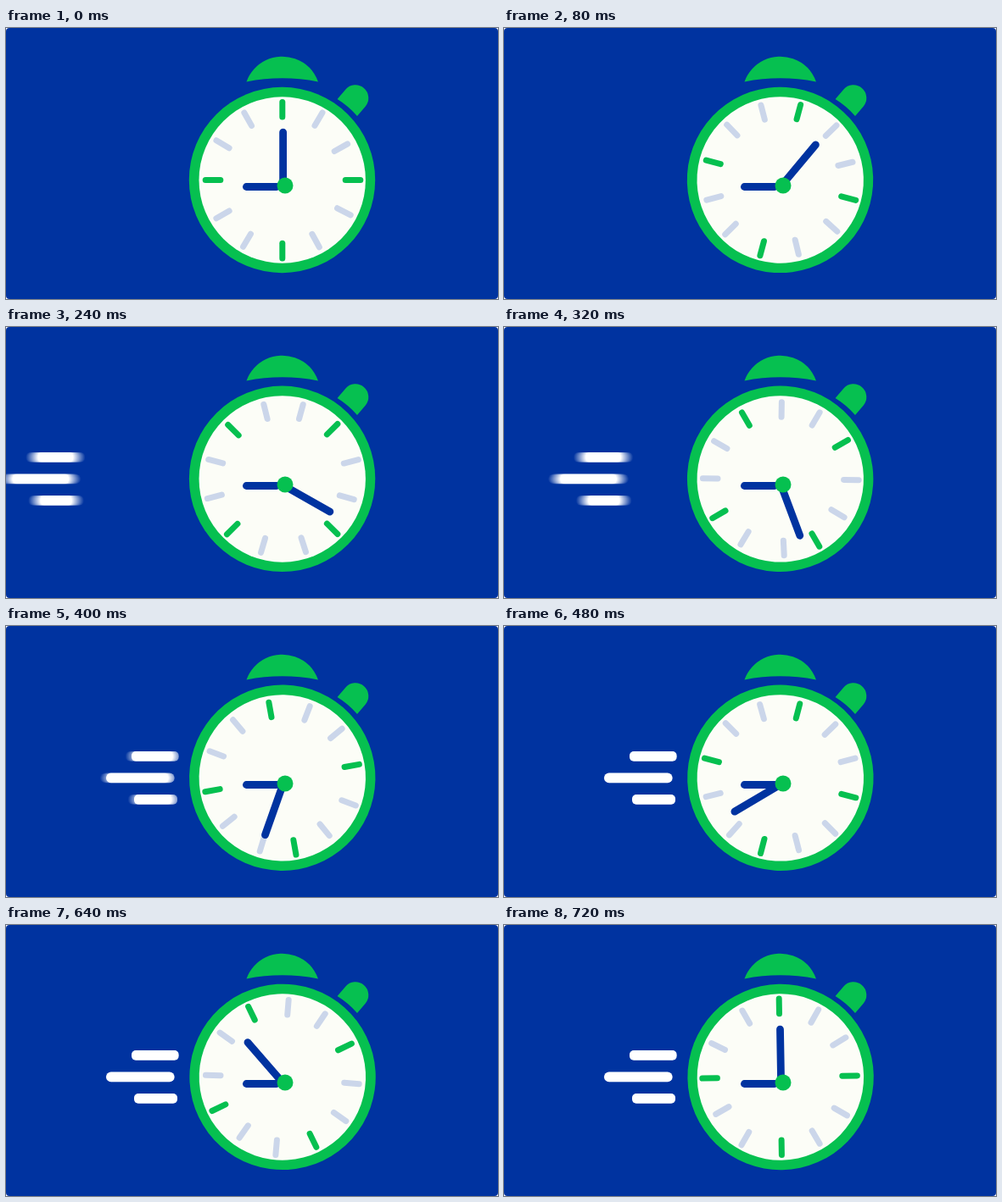
These frames come from a looping animation (580 by 320 pixels, 760 ms). An HTML page with a canvas:

```html
<!DOCTYPE html>
<html lang="en">
<head>
<meta charset="utf-8">
<title>Fast clock</title>
<style>
  html, body { margin: 0; width: 100%; height: 100%; overflow: hidden; background: #fff; }
  canvas { display: block; }
</style>
</head>
<body>
<canvas id="stage" width="580" height="320"></canvas>
<script>
const BLUE = '#0033a0', GREEN = '#06c050', FACE = '#fcfdf7', PALE = '#cbd6ea';
const LOOP = 760, STEP = 40;
const CENTER = { x: 325.8, y: 179.5 };
const PIVOT = { x: 326.6, y: 186.7 };

// Hand-drawn dial: angle in degrees and distance from the center
const TICKS = [
  [0, 83.2], [30.7, 83.6], [61, 79], [90, 83.2], [117.2, 81.6], [151.2, 81.6],
  [180, 83.6], [210.4, 82.6], [239.8, 81.3], [270, 81.8], [301, 82], [330.5, 82.5]
];
// Speed lines at rest: x, y, width, corner radius
const STREAKS = [[148, 148, 55.6, 5], [118, 173.6, 80.6, 5.8], [151, 199, 51, 5]];

const ctx = document.getElementById('stage').getContext('2d');
const blurLayer = document.createElement('canvas');
blurLayer.width = 220;
blurLayer.height = 320;
const blurCtx = blurLayer.getContext('2d');

const rad = deg => deg * Math.PI / 180;

function disc(x, y, r, color) {
  ctx.fillStyle = color;
  ctx.beginPath();
  ctx.arc(x, y, r, 0, Math.PI * 2);
  ctx.fill();
}

function bar(x1, y1, x2, y2, width, color) {
  ctx.strokeStyle = color;
  ctx.lineWidth = width;
  ctx.lineCap = 'round';
  ctx.beginPath();
  ctx.moveTo(x1, y1);
  ctx.lineTo(x2, y2);
  ctx.stroke();
}

function drawBackground() {
  ctx.clearRect(0, 0, 580, 320);
  ctx.fillStyle = BLUE;
  ctx.beginPath();
  ctx.roundRect(0, 0, 580, 320, 4);
  ctx.fill();
}

function drawBell() {
  ctx.fillStyle = GREEN;
  ctx.beginPath();
  ctx.arc(325.7, 78.5, 44.8, rad(199.5), rad(340.5));
  ctx.quadraticCurveTo(325.7, 55.2, 283.5, 63.5);
  ctx.fill();
}

function drawButton() {
  ctx.save();
  ctx.translate(411.9, 82.7);
  ctx.rotate(rad(40.5));
  ctx.beginPath();
  ctx.arc(0, 0, 15.4, Math.PI, 0);
  ctx.lineTo(15.4, 14.8);
  ctx.quadraticCurveTo(0, 12.4, -15.4, 14.8);
  ctx.fillStyle = GREEN;
  ctx.fill();
  ctx.restore();
}

// The dial speeds up halfway through
function dialAngle(t) {
  return t < 360 ? t * 0.1875 : 67.5 + (t - 360) * 111.5 / 360;
}

function drawDial(t) {
  ctx.save();
  ctx.translate(CENTER.x, CENTER.y);
  ctx.rotate(rad(dialAngle(t)));
  disc(-0.3, 0, 109.7, GREEN);
  disc(-0.1, 0, 98.2, FACE);
  TICKS.forEach(([angle, r], i) => {
    ctx.save();
    ctx.rotate(rad(angle));
    bar(0, -r - 8.8, 0, -r + 8.8, 7, i % 3 ? PALE : GREEN);
    ctx.restore();
  });
  ctx.restore();
}

function drawHands(t) {
  const angle = rad(359 * t / 720);
  bar(283.4, 187.5, 319, 187.5, 8.8, BLUE);
  bar(PIVOT.x, PIVOT.y,
      PIVOT.x + 63.6 * Math.sin(angle), PIVOT.y - 63.6 * Math.cos(angle), 8.8, BLUE);
  disc(329, 186, 9.5, GREEN);
}

// Average of several moments gives motion blur
function drawStreaks(t) {
  const samples = 15, shutter = 20;
  blurCtx.clearRect(0, 0, 220, 320);
  blurCtx.globalCompositeOperation = 'lighter';
  blurCtx.fillStyle = '#fff';
  blurCtx.globalAlpha = 1 / samples;
  for (let i = 0; i < samples; i++) {
    const moment = t + ((i + 0.5) / samples - 0.5) * shutter;
    const shift = Math.min(0, (moment - 400) * 0.734);
    for (const [x, y, w, r] of STREAKS) {
      blurCtx.beginPath();
      blurCtx.roundRect(x + shift, y, w, 11.7, r);
      blurCtx.fill();
    }
  }
  ctx.drawImage(blurLayer, 0, 0);
}

const start = performance.now();

function render(now) {
  const t = Math.floor(Math.max(0, now - start) % LOOP / STEP) * STEP;
  drawBackground();
  drawStreaks(t);
  drawBell();
  drawButton();
  drawDial(t);
  drawHands(t);
  requestAnimationFrame(render);
}
render(start);
</script>
</body>
</html>
```
